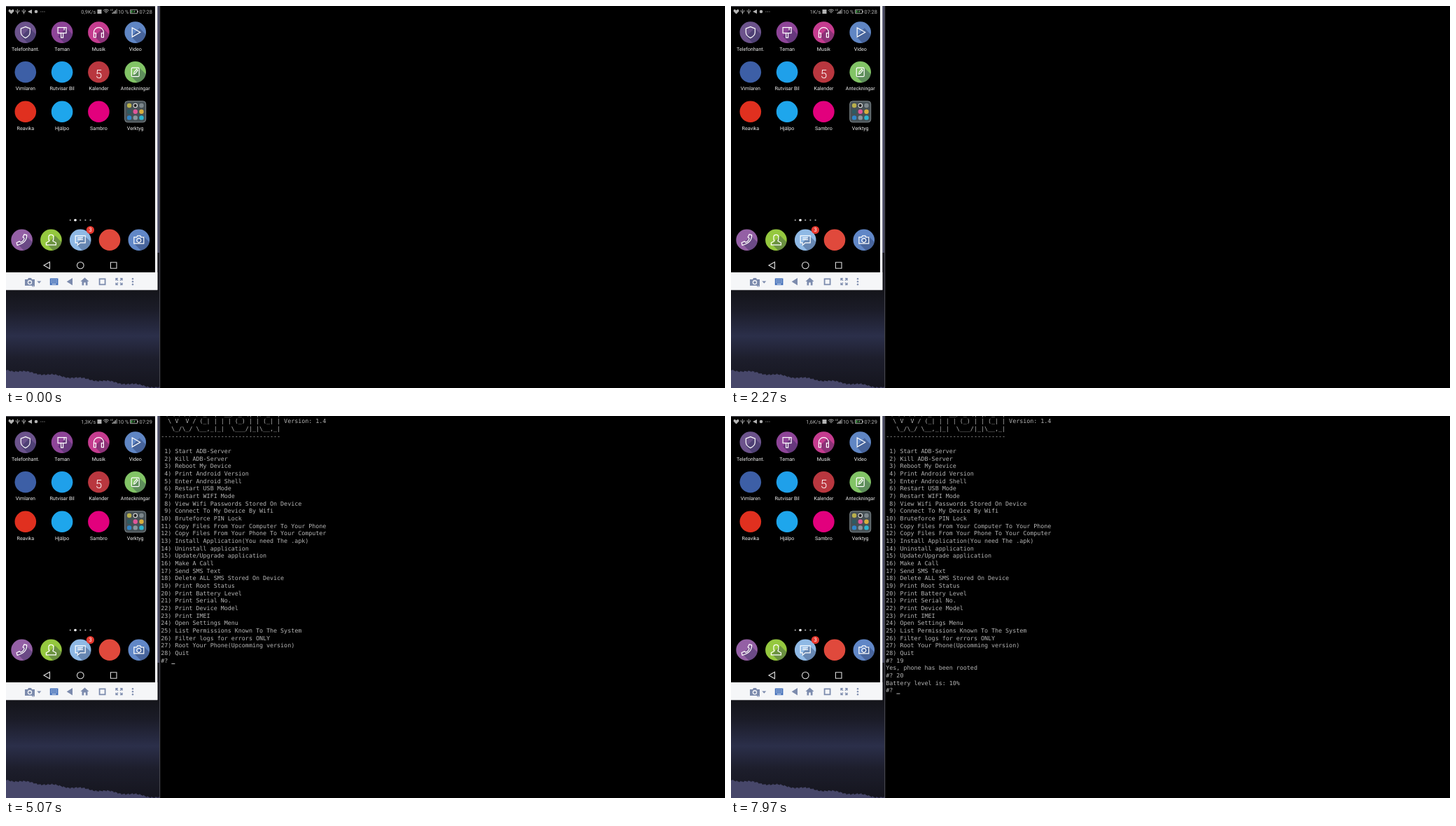
Recreate the animation shown at these times as an HTML page with a canvas. Size 1027 px wide and 545 px high, loop 8 s.

```html
<!DOCTYPE html>
<html lang="en">
<head>
<meta charset="utf-8">
<title>Phone and terminal</title>
<style>
html, body { margin: 0; width: 100%; height: 100%; overflow: hidden; background: #000; }
canvas { display: block; }
</style>
</head>
<body>
<canvas width="1027" height="545"></canvas>
<script>
const ctx = document.querySelector('canvas').getContext('2d');
const LOOP = 8000;
const SANS = 'Roboto, sans-serif';
const MONO = '"DejaVu Sans Mono", monospace';
const TERM = { x: 221.3, y: 10.3, row: 10.67, col: 5.027 };

const BANNER = [
  " \\ \\ /\\ / / _` | '__/ _ \\| |/ _` |",
  '  \\ V  V / (_| | | | (_) | | (_| | Version: 1.4',
  '   \\_/\\_/ \\__,_|_|  \\___/|_|\\__,_|',
  '-'.repeat(34),
  ''
];
const MENU = `Start ADB-Server
Kill ADB-Server
Reboot My Device
Print Android Version
Enter Android Shell
Restart USB Mode
Restart WIFI Mode
View Wifi Passwords Stored On Device
Connect To My Device By Wifi
Bruteforce PIN Lock
Copy Files From Your Computer To Your Phone
Copy Files From Your Phone To Your Computer
Install Application(You need The .apk)
Uninstall application
Update/Upgrade application
Make A Call
Send SMS Text
Delete ALL SMS Stored On Device
Print Root Status
Print Battery Level
Print Serial No.
Print Device Model
Print IMEI
Open Settings Menu
List Permissions Known To The System
Filter logs for errors ONLY
Root Your Phone(Upcomming version)
Quit`.split('\n').map((label, i) => `${String(i + 1).padStart(2)}) ${label}`);

// Typed commands: key times, answer time, answer
const SESSION = [
  { cmd: '19', keys: [5500, 5650], done: 6100, reply: 'Yes, phone has been rooted' },
  { cmd: '20', keys: [6900, 7050], done: 7350, reply: 'Battery level is: 10%' }
];

const GLYPH = {
  shield: 'M0-8L6.5-5.5V0Q6.5 5 0 8Q-6.5 5-6.5 0V-5.5Z',
  brush: 'M-6-7H6V1H-6ZM-1.5 1V7.5H1.5V1M3-7V-3',
  phones: 'M-7 3V0A7 7 0 0 1 7 0V3M-7 1H-4V7H-7ZM4 1H7V7H4Z',
  play: 'M-4.5-6.5L7 0L-4.5 6.5Z',
  note: 'M-4-6H4Q5.5-6 5.5-4.5V5Q5.5 6.5 4 6.5H-4Q-5.5 6.5-5.5 5V-4.5Q-5.5-6-4-6ZM-2 3L-1.5 0L2-4L3.5-2.5L0 2Z',
  call: 'M3.5-8L7-7Q7.5 4-6.5 7.5L-7.5 4L-3.5 2L-1.5 3.5Q3 1 3.5-2.5L1.5-4Z',
  person: 'M-2.5 1.5Q-3.8-1-3.5-4A3.5 3.5 0 0 1 3.5-4Q3.8-1 2.5 1.5L7 4V7H-7V4Z',
  message: 'M-7-6H7V4H0L-4 7.5V4H-7ZM-4-3H4M-4-.5H4',
  camera: 'M-7-4H-3L-2-6H2L3-4H7V5H-7ZM3 .5A3 3 0 1 1-3 .5A3 3 0 1 1 3 .5',
  heart: 'M0 3.5L-4-.5Q-4-3.5-2-3.2L0-1.8L2-3.2Q4-3.5 4-.5Z',
  usb: 'M0-3.5V3.5M-2.2-2V0L0 1.5L2.2 0V-2',
  home: 'M0-5.5L6 0H4V5.5H1.3V1.5H-1.3V5.5H-4V0H-6Z',
  snap: 'M-7-3.5H-3L-2-5.5H2L3-3.5H7V5.5H-7Z',
  expand: 'M-4.5-1.5V-4.5H-1.5M1.5-4.5H4.5V-1.5M4.5 1.5V4.5H1.5M-1.5 4.5H-4.5V1.5M-4.5-4.5L-1.5-1.5M4.5-4.5L1.5-1.5M4.5 4.5L1.5 1.5M-4.5 4.5L-1.5 1.5'
};

// label, colour, glyph
const APPS = [
  ['Telefonhant.', '#6c538c', 'shield'], ['Teman', '#8e4598', 'brush'],
  ['Musik', '#c53c8f', 'phones'], ['Video', '#6086c4', 'play'],
  ['Vimlaren', '#3d5fa6'], ['Rutvisar Bil', '#1fa0ea'],
  ['Kalender', '#b9373f'], ['Anteckningar', '#82c466', 'note'],
  ['Reavika', '#e0301f'], ['Hjälpo', '#1ea6ec'], ['Sambro', '#e2007d'], ['Verktyg']
];
const DOCK = [
  ['#9460a5', 'call'], ['#95c83f', 'person'], ['#8fb9e5', 'message'], ['#e0493c'], ['#6187c7', 'camera']
];
const FOLDER = ['#b9b04c', '#e8e8e8', '#7d878c', '#2f5a62', '#e0569a', '#d8ae3c', '#2f86c9', '#8b979e', '#2cb5cf'];

function rect(x, y, w, h, color) {
  ctx.fillStyle = color;
  ctx.fillRect(x, y, w, h);
}

function disc(x, y, r, color) {
  ctx.fillStyle = color;
  ctx.beginPath();
  ctx.arc(x, y, r, 0, 7);
  ctx.fill();
}

function glyph(x, y, d, color, width = 0) {
  const path = new Path2D(d);
  ctx.save();
  ctx.translate(x, y);
  ctx.fillStyle = ctx.strokeStyle = color;
  ctx.lineWidth = width;
  if (width) ctx.stroke(path); else ctx.fill(path);
  ctx.restore();
}

function text(s, x, y, size, color, align = 'left', family = SANS, weight = 400) {
  ctx.font = `${weight} ${size}px ${family}`;
  ctx.textAlign = align;
  ctx.fillStyle = color;
  ctx.fillText(s, x, y);
}

function icon(x, y, color, name) {
  disc(x, y, 15.3, color);
  if (!name) return;
  ctx.save();
  ctx.beginPath();
  ctx.arc(x, y, 15.3, 0, 7);
  ctx.clip();
  glyph(x, y, 'M6-6L36 24L24 36L-6 6Z', 'rgba(20,30,70,.32)');
  ctx.restore();
  glyph(x, y, GLYPH[name], '#fff', 1.2);
}

function desktop() {
  const sky = ctx.createLinearGradient(0, 405, 0, 545);
  [[0, '#14141a'], [.2, '#1b1c28'], [.47, '#2b2f4a'], [.7, '#1d1e2c'], [1, '#15151e']]
    .forEach(([at, color]) => sky.addColorStop(at, color));
  rect(0, 405, 219, 140, sky);
  ctx.beginPath();
  ctx.moveTo(0, 545);
  for (let x = 0; x <= 219; x++) {
    ctx.lineTo(x, 519 + x * .115 + Math.sin(x * .16) * 1.2 + Math.sin(x * 1.7) * Math.sin(x * .6) * 1.3);
  }
  ctx.lineTo(219, 545);
  ctx.fillStyle = '#47476a';
  ctx.fill();
  rect(216, 0, 3, 352, '#4a4c64');
  rect(216, 352, 3, 53, '#16161d');
  rect(219, 0, 1.5, 545, '#45454d');
}

function statusBar(t) {
  const grey = '#b4b4b4';
  glyph(7.5, 8, GLYPH.heart, grey);
  glyph(16.5, 8, GLYPH.usb, grey, .9);
  glyph(25.5, 8, GLYPH.usb, grey, .9);
  glyph(34, 8, 'M-3 0L3-3V3Z', grey);
  disc(43, 8, 2.3, grey);
  for (const x of [50, 52.5, 55]) disc(x, 8, .6, grey);

  const speed = t < 400 ? '0,9' : t < 3200 ? '1' : t < 6000 ? '1,3' : '1,6';
  text(speed + 'K/s', 128.3, 10.6, 7.3, grey, 'right');
  rect(130.5, 5, 6, 6, grey);
  for (const r of [2, 4, 6]) {
    ctx.beginPath();
    ctx.arc(143, 11, r, -2.3, -.84);
    ctx.strokeStyle = grey;
    ctx.lineWidth = 1;
    ctx.stroke();
  }
  text('4G', 148.5, 7, 3.8, grey);
  for (let i = 0; i < 4; i++) rect(151.5 + i * 2, 9.5 - i * 1.7, 1.4, 1.5 + i * 1.7, i < 3 ? grey : '#777');
  text('10 %', 160, 10.6, 7.3, grey);
  glyph(182.5, 8, 'M-5-2.7H5V2.7H-5ZM6-1V1', grey, .9);
  rect(178.5, 6.3, 2, 3.4, '#4fae55');
  glyph(183, 8, 'M.8-2L-1.5 .4H0L-.6 2L1.8-.4H.3Z', '#62c26a');
  text(t < 3900 ? '07:28' : '07:29', 190.5, 10.6, 7.4, grey);
}

function folder(x, y) {
  ctx.beginPath();
  ctx.roundRect(x - 15, y - 15, 30, 30, 4);
  ctx.fillStyle = '#465055';
  ctx.fill();
  ctx.strokeStyle = '#8b9498';
  ctx.lineWidth = .9;
  ctx.stroke();
  FOLDER.forEach((color, i) => disc(x - 8.6 + i % 3 * 8.7, y - 8.8 + (i / 3 | 0) * 8.7, 3.2, color));
  disc(x, y - 8.8, 2.2, '#222');
}

function phone(t) {
  rect(0, 0, 213, 380, '#000');
  rect(0, 0, 216, 1, '#55555c');
  rect(213, 0, 3.3, 405, '#f4f4f6');
  statusBar(t);

  APPS.forEach(([label, color, name], i) => {
    const x = 27.8 + i % 4 * 52.3, y = 37.6 + (i / 4 | 0) * 56.6;
    if (color) icon(x, y, color, name); else folder(x, y);
    text(label, x, y + 25.9, 7.1, '#eee', 'center');
  });
  text('5', 132.4, 103.2, 17, '#fff', 'center', SANS, 300);

  for (let i = 0; i < 5; i++) disc(91.8 + i * 7.2, 305.5, i === 1 ? 1.8 : 1.1, i === 1 ? '#fff' : '#aaa');
  DOCK.forEach(([color, name], i) => icon(22.6 + i * 41.8, 333.8, color, name));
  disc(120.4, 319.5, 5.6, '#e8392f');
  text('3', 120.4, 322.4, 8, '#fff', 'center');

  glyph(58.5, 370, 'M-4.5 0L4-4.7V4.7Z', '#ddd', 1.1);
  glyph(106.3, 370, 'M4.8 0A4.8 4.8 0 1 1-4.8 0A4.8 4.8 0 1 1 4.8 0', '#ddd', 1.1);
  glyph(153.7, 370, 'M-4.3-4.3H4.3V4.3H-4.3Z', '#ddd', 1.1);
}

function toolbar() {
  const tone = '#7c8bad', paper = '#f5f6f8';
  rect(0, 380, 216.3, 25.3, paper);
  glyph(34, 393.5, GLYPH.snap, tone);
  disc(34, 394.3, 3.2, paper);
  disc(34, 394.3, 1.9, tone);
  glyph(39, 397.5, 'M-1.5-2.5H1.5V2.5H-1.5Z', tone, .9);
  glyph(47.3, 394, 'M-3-1.5H3L0 1.7Z', tone);
  rect(62.8, 388.6, 11.6, 9.6, '#3e6cb8');
  for (let i = 0; i < 12; i++) rect(64.3 + i % 4 * 2.4, 390.1 + (i / 4 | 0) * 2.1, 1.3, 1, paper);
  rect(65.5, 396.4, 6.2, .9, paper);
  glyph(91, 393.3, 'M-4.3 0L4-5.3V5.3Z', tone);
  glyph(112.5, 393, GLYPH.home, tone);
  glyph(137.6, 393.3, 'M-4-4H4V4H-4Z', tone, 1.8);
  glyph(161.5, 393.2, GLYPH.expand, tone, 1.3);
  for (const dy of [-4, 0, 4]) disc(181, 393.3 + dy, 1.2, tone);
}

function terminal(t) {
  rect(220.5, 0, 806.5, 545, '#000');
  if (t < 2900) return;
  const lines = [...BANNER, ...MENU];
  let prompt = '#? ';
  for (const { cmd, keys, done, reply } of SESSION) {
    prompt += cmd.slice(0, keys.filter(k => t >= k).length);
    if (t < done) break;
    lines.push(prompt, reply);
    prompt = '#? ';
  }
  lines.push(prompt);
  const baseline = i => TERM.y + (i - 1) * TERM.row;
  lines.forEach((line, i) => text(line, TERM.x, baseline(i), 8.35, '#b6b6b6', 'left', MONO));
  if ((t + 100) % 1000 < 500) {
    rect(TERM.x + prompt.length * TERM.col, baseline(lines.length - 1) + 1.2, TERM.col, 1, '#b6b6b6');
  }
}

function draw(now) {
  const t = now % LOOP;
  ctx.textRendering = 'geometricPrecision';
  rect(0, 0, 1027, 545, '#000');
  desktop();
  phone(t);
  toolbar();
  terminal(t);
  requestAnimationFrame(draw);
}
requestAnimationFrame(draw);
</script>
</body>
</html>
```
